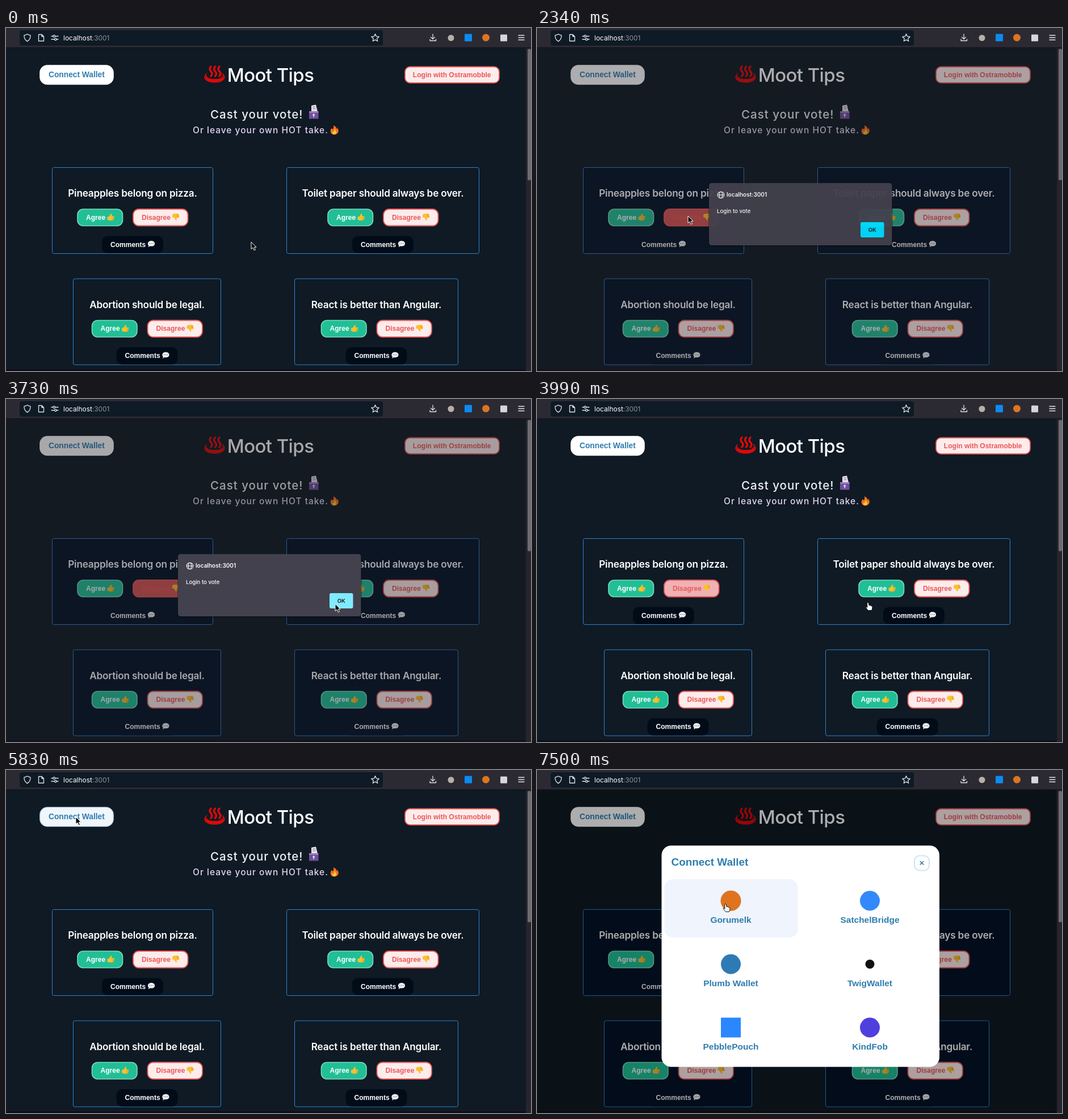
Write an HTML page that moves like this. It is 925x606 px and loops after 8000 ms.

```html
<!DOCTYPE html>
<html lang="en">
<head>
<meta charset="utf-8">
<title>Cast your vote</title>
<style>
  html, body { margin: 0; width: 100%; height: 100%; overflow: hidden; background: #0f1a24; }
  svg { display: block; width: 925px; height: 606px; }
  text { font-family: Inter, Roboto, sans-serif; fill: #fff; white-space: pre; }
  .btn { font: bold 12.04px "Liberation Sans", Arial, sans-serif; }
  .blue { font: bold 15.48px "Liberation Sans", Arial, sans-serif; fill: #2e7daf; }
  .mid { text-anchor: middle; }
  .title { font-size: 17.2px; font-weight: 600; letter-spacing: -.2px; }
  .line { fill: none; stroke: #e4e4e8; stroke-width: 1.3; stroke-linecap: round; stroke-linejoin: round; }
  .red { fill: #fdecec; stroke: #eb5757; stroke-width: 1.8; }
  .redText { fill: #eb5757; }
  .card { fill: #0f1a24; stroke: #3182ce; }
  .chat { fill: #020c18; }
  .dimmed .card, .dimmed .chat { fill: #031226; }
</style>
</head>
<body>
<svg id="stage" viewBox="0 0 925 606">
  <defs>
    <g id="thumb">
      <path d="M-3-1L.4-6Q2.6-6 1.8-3L1.4-1.5H5.4Q6.8-.8 6 .6Q6.6 1.8 5.6 2.6Q6 3.8 4.8 4.5Q4.8 6 3 6H-2Q-5 6-6 4V0Q-5-1-3-1z" fill="#fcc02e"/>
      <path d="M2 1H6M2 3H5.4M2 5H4.6" stroke="#d88a1c" stroke-width=".7"/>
    </g>
    <g id="bubble">
      <path d="M0-5.5C8-5.5 8 4 1 4L-3 4Q-4 5.6-5.6 5.6Q-4.4 4.4-4.8 2.8C-8-1-5-5.5 0-5.5z" fill="#eef0f2"/>
      <path d="M-3-.7h.1M0-.7h.1M3-.7h.1" stroke="#6d7278" stroke-width="1.5" stroke-linecap="round"/>
    </g>
  </defs>

  <g id="page"></g>
  <rect id="dim" y="35" width="916" height="571"/>

  <g id="alert">
    <rect x="302" y="274" width="325" height="112" rx="5" fill="#000" opacity=".3"/>
    <rect x="303" y="274" width="322.5" height="110" rx="4.5" fill="#42414d"/>
    <g class="line" style="stroke:#fbfbfe;stroke-width:1.1">
      <circle cx="324" cy="295" r="5.7"/><ellipse cx="324" cy="295" rx="2.6" ry="5.7"/><path d="M318.5 295h11"/>
    </g>
    <text x="334" y="298" font-size="10" font-weight="600">localhost:3001</text>
    <text x="317" y="327" font-size="9.6" font-weight="500">Login to vote</text>
    <rect id="ok" x="570" y="343" width="41.5" height="27" rx="3"/>
    <text class="mid" x="590.7" y="360" font-size="9.5" font-weight="600" style="fill:#15141a">OK</text>
  </g>

  <g id="modal">
    <rect x="219.5" y="133.5" width="489.5" height="391" rx="17" fill="#fff"/>
    <text class="blue" x="236.5" y="169" style="font-size:18.9px">Connect Wallet</text>
    <rect x="665" y="151.5" width="26" height="26" rx="9" fill="#fff" stroke="#cfe3f3" stroke-width="2"/>
    <path d="M674.8 161l6.4 6.4m0-6.4l-6.4 6.4" stroke="#2e7daf" stroke-width="1.6"/>
    <rect id="glow" x="224.5" y="193" width="235" height="103" rx="15" fill="#eff4fd"/>
  </g>

  <g id="bar">
    <rect width="925" height="35" fill="#2b2a33"/>
    <rect y="34" width="925" height="1.5" fill="#15141a"/>
    <rect x="24" y="4" width="640" height="27" rx="4" fill="#0e1a25"/>
    <g class="line">
      <path d="M37.5 10.8Q40 12.6 43 12.8Q43.6 20 37.5 23.6Q31.4 20 32 12.8Q35 12.6 37.5 10.8z"/>
      <path d="M57.5 11.5h5.5l3.5 3.5v8h-9zM63 11.5v3.5h3.5"/>
      <path d="M80 14.5h2.500m4.500 0h5M80 20h5m4.500 0h2.500"/>
      <circle cx="84.700" cy="14.5" r="1.8"/><circle cx="87.300" cy="20" r="1.8"/>
      <path d="M650.5 10.5l2 4.4 4.7.5-3.5 3.2 1 4.7-4.2-2.4-4.2 2.4 1-4.7-3.5-3.2 4.7-.5z"/>
      <path d="M752 11v8.5m-3.5-3.3l3.5 3.4 3.5-3.4M747 20v2.5h10.5V20"/>
      <path d="M903 13h10m-10 4h10m-10 4h10"/>
    </g>
    <text x="101" y="22" font-size="11.9">localhost<tspan fill="#8f9299">:3001</tspan></text>
    <circle cx="784" cy="17.5" r="5.5" fill="#b8b0a8"/>
    <rect x="808" y="10.5" width="13" height="13" rx="1" fill="#0c8bf0"/>
    <circle cx="845.5" cy="17" r="6.5" fill="#df7420"/>
    <rect x="871" y="11.5" width="12" height="12" rx="1" fill="#d6d6da"/>
    <rect x="916" y="35.5" width="9" height="571" fill="#26252e"/>
    <rect x="919" y="37" width="6" height="232" rx="2.5" fill="#6c6b72"/>
  </g>

  <path id="arrow" d="M0 0V12.6L3 9.9L5.2 14.8L7.4 13.8L5.3 9.2H9z" fill="#000" stroke="#fff"/>
  <path id="hand" d="M-1.4 1Q-1.4-.4 0-.4T1.4 1L2 4.5Q3.4 3.6 4 5Q5.5 4.3 6 5.8Q8 5.3 8 7.5Q8.2 11 6.5 13.5H.5Q-2 11-4 7.5Q-3.5 6-1 8.2z" fill="#fff" stroke="#000" stroke-width=".9"/>
</svg>
<script>
const $ = id => document.getElementById(id);
const set = (id, attrs) => { for (const k in attrs) $(id).setAttribute(k, attrs[k]); };

const card = (title, cx, width, y, id) => `
  <rect class="card" x="${cx - width / 2}" y="${y}" width="${width}" height="152" rx="3"/>
  <text class="title mid" x="${cx}" y="${y + 51.5}">${title}</text>
  <rect x="${cx - 97}" y="${y + 73.5}" width="79.5" height="29.5" rx="10" fill="#21bf96" stroke="#7ad9bf" stroke-width="1.6"/>
  <text class="btn" x="${cx - 82}" y="${y + 92}">Agree</text>
  <use href="#thumb" x="${cx - 38.5}" y="${y + 87.5}"/>
  <rect id="${id}" class="red" x="${cx + 1}" y="${y + 73.5}" width="96.5" height="29.5" rx="10"/>
  <text class="btn redText" x="${cx + 16}" y="${y + 92}">Disagree</text>
  <use href="#thumb" transform="translate(${cx + 76} ${y + 87.5}) scale(1 -1)"/>
  <rect class="chat" x="${cx - 54}" y="${y + 121}" width="108" height="30.5" rx="10"/>
  <text class="btn" x="${cx - 39}" y="${y + 140}">Comments</text>
  <use href="#bubble" x="${cx + 33}" y="${y + 135}"/>`;

$('page').innerHTML = `
  <rect y="35" width="916" height="571" fill="#0f1a24"/>
  <rect y="603" width="916" height="3" fill="#100c1c"/>
  <rect id="connect" x="60" y="66" width="129" height="33.5" rx="13" stroke-width="1.6"/>
  <text class="blue" x="75" y="87" style="font-size:13.76px">Connect Wallet</text>
  <g fill="none" stroke="#e00808" stroke-width="3.4" stroke-linecap="round">
    ${[360, 367.5, 375].map(x => `<path d="M${x + 1} 68q-4 4 0 8.5t0 8.5"/>`).join('')}
  </g>
  <path transform="translate(.5 0)" d="M354 79C349 88 352 96.5 367 96.5S385 88 380 79C390 86 385 96.5 367 96.5S344 86 354 79zM353 84C355 90 361 90 367 90S379 90 381 84C384 92 378 96.5 367 96.5S350 92 353 84z" fill="#e00808"/>
  <text class="mid" x="466" y="95" font-size="33" font-weight="500" letter-spacing="-.6">Moot Tips</text>
  <rect class="red" x="703" y="68.5" width="166" height="28.5" rx="9"/>
  <text class="btn redText mid" x="785.7" y="86.5">Login with Ostramobble</text>
  <text x="360" y="160" font-size="20.5" font-weight="500" letter-spacing="1" style="fill:#eef0f6">Cast your vote!</text>
  <path d="M538 137l8-1.5 3 12h-11z" fill="#e3e1ea"/>
  <path d="M540 140l5-1m-4.5 4l5-1" stroke="#77737f"/>
  <rect x="534" y="147" width="16.5" height="13.5" rx="1" fill="#704f9c"/>
  <rect x="534" y="147" width="16.5" height="3" fill="#9a7cc4"/>
  <path d="M542.2 151.5v6m-2-4h4" stroke="#eee" stroke-width="1.5"/>
  <text x="329" y="186" font-size="15.5" font-weight="500" letter-spacing="1" style="fill:#e4d6f3">Or leave your own HOT take.</text>
  <path d="M577 172Q582 174 583 179Q584 178 584 176Q587 181 585 185Q582 188.5 578 188.5Q573 188 572 184Q571 180 574 177Q575 179 576 179Q578 176 577 172z" fill="#f5701e"/>
  <path d="M578.5 178Q582 182 582 185Q581 188 578 188Q574.5 187 575 183Q576 184 577 184Q579 181 578.5 178z" fill="#fdc83a"/>
  ${card('Pineapples belong on pizza.', 223, 283, 246.5, 'vote')}
  ${card('Toilet paper should always be over.', 664, 339, 246.5, 'vote2')}
  ${card('Abortion should be legal.', 248.5, 260, 443, 'vote3')}
  ${card('React is better than Angular.', 652.5, 288, 443, 'vote4')}`;

const wallets = [
  ['Gorumelk', '#df7420', 18], ['SatchelBridge', '#3389fb', 17.5],
  ['Plumb Wallet', '#2e7ab5', 17.5], ['TwigWallet', '#111', 8],
  ['PebblePouch', '#2b87ff', 17.5, 1], ['KindFob', '#503fdf', 17.5]];
$('modal').insertAdjacentHTML('beforeend', wallets.map(([name, color, r, square], i) => {
  const x = i % 2 ? 586.5 : 341.5, y = 231 + 112 * (i >> 1);
  return `<rect x="${x - r}" y="${y - r}" width="${2 * r}" height="${2 * r}" rx="${square ? 0 : r}" fill="${color}"/>
    <text class="blue mid" x="${x}" y="${y + 38.5}">${name}</text>`;
}).join(''));

// Each step holds until the next one: time, then values.
const pointer = [
  [0, 432, 378], [890, 410, 371], [1040, 365, 356], [1190, 322, 345],
  [1340, 285, 338, 1], [1490, 268, 335, 1], [1960, 266, 332],
  [2930, 290, 338], [3080, 345, 349], [3230, 420, 361], [3380, 500, 370],
  [3530, 555, 369], [3680, 580, 362], [3860, 583, 360],
  [3990, 583, 360, 1], [4140, 568, 340], [4290, 500, 290], [4430, 390, 240],
  [4570, 290, 195], [4720, 218, 160], [5020, 204, 148], [5180, 172, 120],
  [5340, 138, 92], [5500, 123, 83], [6610, 190, 133], [6780, 285, 203], [6940, 332, 237, 1]];
const voteFill = [[0, '#fdecec'], [1340, '#eba0a1'], [1490, '#d65354'], [3990, '#efb2b4'], [4140, '#fdecec']];
const alertFade = [[0, 0], [1960, .4], [2130, .8], [2300, .95], [2480, 1], [3990, 0]];
const glowFade = [[0, 0], [6940, .5], [7220, .8], [7500, 1]];
const at = (steps, t) => steps.filter(s => s[0] <= t).pop().slice(1);

function draw(now) {
  const t = now % 8000;
  const [x, y, hand] = at(pointer, t);
  const [fade] = at(alertFade, t);
  const open = t >= 6010, over = t >= 5340 && !open;

  for (const id of ['arrow', 'hand'])
    set(id, { transform: `translate(${x} ${y})`, visibility: (id === 'hand') === !!hand ? 'visible' : 'hidden' });

  const [fill] = at(voteFill, t);
  set('vote', { style: `fill:${fill}` });
  set('connect', { fill: over ? '#f0f6fc' : '#fff', stroke: over ? '#c7dff2' : '#fff' });
  set('page', { class: open || fade ? 'dimmed' : '' });
  set('dim', { fill: open ? '#000' : '#1c1b20', opacity: open ? .32 : .38 * fade });
  set('alert', { opacity: fade });
  set('ok', { fill: t >= 3680 ? '#80ebff' : '#00ddff' });
  set('modal', { visibility: open ? 'visible' : 'hidden' });
  set('glow', { opacity: at(glowFade, t)[0] });
  requestAnimationFrame(draw);
}
requestAnimationFrame(draw);
</script>
</body>
</html>
```
